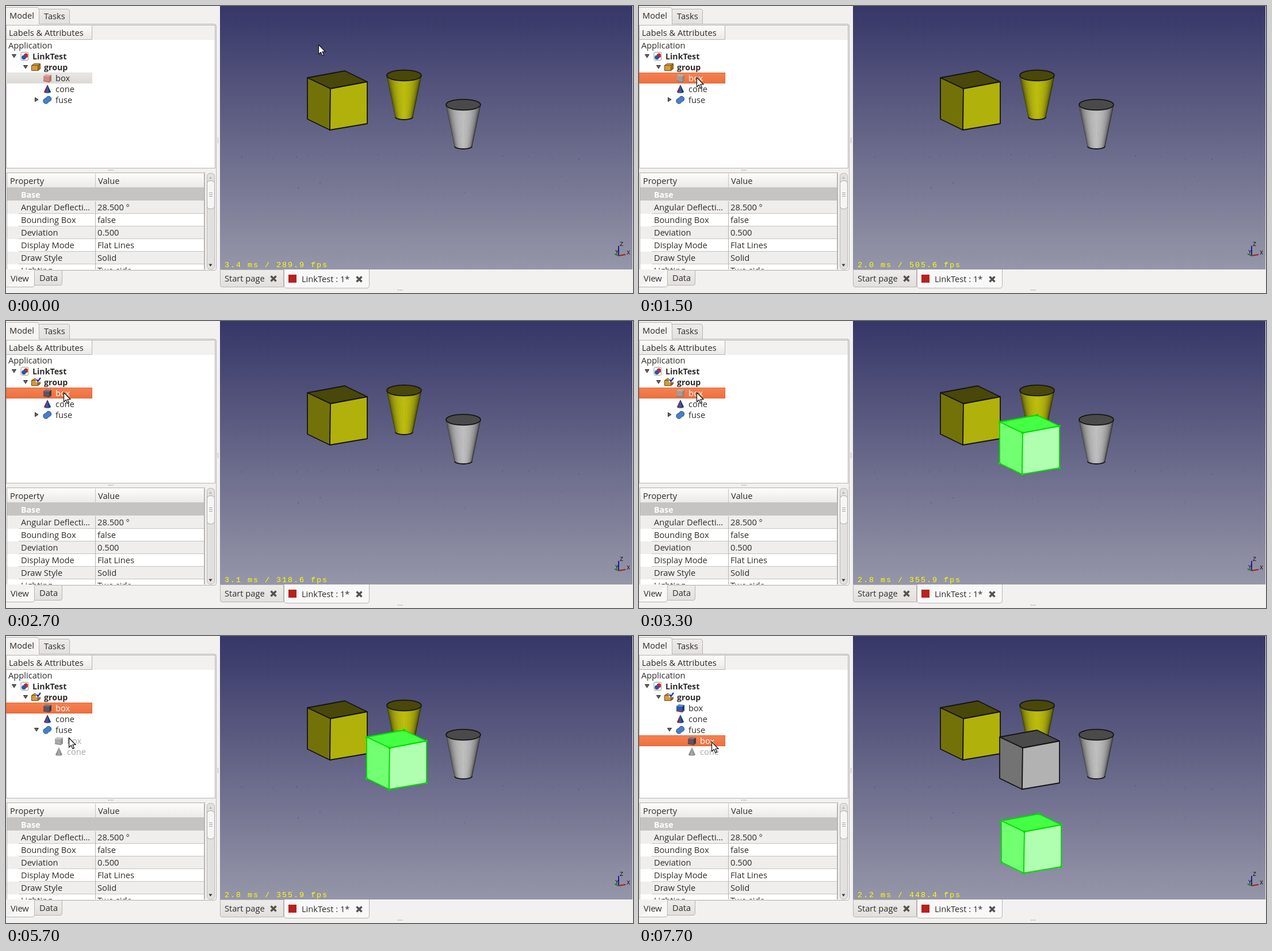
An HTML page for the animation above (8 s loop, 1090x500 px).

```html
<!DOCTYPE html>
<html lang="en">
<head>
<meta charset="utf-8">
<title>Link test</title>
<style>
  html, body { margin: 0; width: 100%; height: 100%; overflow: hidden; background: #f2f1f0; }
  svg { display: block; width: 100%; height: 100%; }
  text { font: 14.67px "Open Sans", sans-serif; fill: #2e2c2a; white-space: pre; }
  .bold { font-size: 14.2px; font-weight: 700; }
  .tree .faded { fill: #aaa8a6; }
  .tree .lit { fill: #fff; }
  .mono { font: 13.33px "Liberation Mono", monospace; letter-spacing: 2px; fill: #ff0; }
  .axis { font: 10px "Liberation Mono", monospace; fill: #111; }
  .line { fill: none; stroke: #b8b4b0; }
  .thin { fill: none; stroke: #c6c3c0; }
  .arrow { fill: #6a6865; stroke: #2e2c2a; }

  /* solids: t top, l left, r right, e edge */
  .yellow { --t: #49470a; --l: #737209; --r: #b1b10c; --e: #141414; --dot: none; }
  .gray { --t: #4a4a4a; --l: #737373; --r: #b2b2b2; --e: #141414; --dot: none; }
  .green { --t: #44ff44; --l: #72ff72; --r: #b0ffb0; --e: #00dc00; --dot: #00dc00; }

  /* tree icons: a front, b side, c top, d accent */
  .normal { --a: #2b5ca8; --b: #1c3b78; --c: #5a86c8; --d: #a3222a; }
  .pink { --a: #cd8a82; --b: #b8746d; --c: #dba79f; --d: #b9655f; }
  .ghost { --a: #aa9a90; --b: #93857d; --c: #bcaea5; --d: #8e7d75; }
  .dark { --a: #5c5560; --b: #3f3a48; --c: #80747a; --d: #6b3a3a; }
  .pale { --a: #a8a8a8; --b: #8f8f8f; --c: #c4c4c4; --d: #8c8c8c; }
</style>
</head>
<body>
<svg viewBox="0 0 1090 500" preserveAspectRatio="none">
  <defs>
    <linearGradient id="sky" x2="0" y2="1"><stop stop-color="#363668"/><stop offset="1" stop-color="#9696a9"/></linearGradient>
    <linearGradient id="head" x2="0" y2="1"><stop stop-color="#fcfcfb"/><stop offset="1" stop-color="#ebe9e7"/></linearGradient>
    <linearGradient id="tab" x2="0" y2="1"><stop stop-color="#eeecea"/><stop offset="1" stop-color="#e2e0dd"/></linearGradient>
    <linearGradient id="orange" x2="0" y2="1"><stop stop-color="#f58150"/><stop offset="1" stop-color="#ee7040"/></linearGradient>
    <linearGradient id="idle" x2="0" y2="1"><stop stop-color="#e9e7e5"/><stop offset="1" stop-color="#dcd9d6"/></linearGradient>

    <g id="cube" stroke="var(--e)" stroke-width="1.8" stroke-linejoin="round">
      <path fill="var(--t)" d="M524 125L589 113L628 132L564 144Z"/>
      <path fill="var(--l)" d="M524 125L564 144L563 216L524 197Z"/>
      <path fill="var(--r)" d="M564 144L628 132V205L563 216Z"/>
      <path fill="none" stroke="var(--dot)" stroke-width="4.5" stroke-linecap="round" d="M524 125h0M589 113h0M628 132h0M564 144h0M563 216h0M524 197h0M628 205h0"/>
    </g>

    <g id="boxIcon">
      <path fill="var(--c)" d="M1 4L5 1L15 2L11 5Z"/>
      <path fill="var(--a)" d="M1 4L11 5V14L1 12Z"/>
      <path fill="var(--b)" d="M11 5L15 2V11L11 14Z"/>
      <path fill="none" stroke="var(--d)" stroke-width="1.300" d="M1 12.500L11 14.500L15 11.500"/>
    </g>
    <g id="coneIcon">
      <path fill="var(--a)" d="M8 0L14 13Q8 17 2 13Z"/>
      <path fill="var(--d)" d="M8 0L5 14.500Q3 14 2 13Z"/>
      <path fill="var(--b)" d="M8 0L14 13L10.500 14.500Z"/>
    </g>
    <g id="fuseIcon" fill="#4680c6" stroke="#2a4f8c">
      <circle cx="10" cy="6" r="4.700"/><circle cx="5.500" cy="9.500" r="4.700"/>
      <path stroke="none" d="M5 6L10 11L13 8L8 3Z"/>
    </g>
    <path id="down" class="arrow" d="M-3.500 -2.500H3.500L0 3Z"/>
    <path id="grip" stroke="#aaa6a2" stroke-width="2" stroke-dasharray="1 1.500" d="M-4 0H5"/>
    <path id="close" fill="none" stroke="#55524e" stroke-width="3.500" d="M-4.500 -4.500L4.500 4.500M4.500 -4.500L-4.500 4.500"/>
  </defs>

  <rect width="1090" height="500" fill="#f2f1f0"/>

  <!-- property editor -->
  <rect x="1.500" y="290.500" width="344" height="169" fill="#fff" class="line"/>
  <rect x="2" y="292" width="342" height="25" fill="url(#head)"/>
  <path class="thin" d="M155.500 292V317M2 316.500H344"/>
  <text x="7" y="310">Property</text><text x="160" y="310">Value</text>
  <rect x="2" y="317" width="342" height="22" fill="#c5c4c3"/>
  <text x="26" y="334" class="bold" style="fill:#fff">Base</text>
  <g id="props"></g>
  <path class="line" d="M155.500 340V459M344.500 292V459"/>
  <rect x="349.500" y="291.500" width="13" height="167" rx="5" fill="#e3e1df" stroke="#bab6b2"/>
  <rect x="349.500" y="304.500" width="13" height="49" rx="5" fill="#f6f5f4" stroke="#a8a4a0"/>
  <path stroke="#a8a4a0" d="M353 325.500h6M353 328.500h6M353 331.500h6"/>
  <path fill="#b9b6b3" d="M353 301h5l-2.500 -4z"/>
  <path fill="#3c3b37" d="M352.500 449.500h6l-3 4.500z"/>

  <!-- left panel frame and tabs -->
  <rect y="459" width="372" height="41" fill="#f2f1f0"/>
  <path class="line" d="M57 31.500H362Q365.500 31.500 365.500 35V456Q365.500 460.500 361 460.500H49"/>
  <path fill="url(#tab)" stroke="#b8b4b0" d="M57.500 31.500V5.500H107Q110.500 5.500 110.500 9V31.500Z"/>
  <path fill="#f6f5f4" stroke="#b8b4b0" d="M0 2.500H53Q57.500 2.500 57.500 7V31.500"/>
  <text x="6" y="22">Model</text><text x="66" y="23">Tasks</text>
  <path fill="url(#tab)" stroke="#b8b4b0" d="M49.500 460.500H97.500V483Q97.500 486.500 94 486.500H49.500Z"/>
  <path fill="#f9f8f8" stroke="#b8b4b0" d="M0 489.500H45Q49.500 489.500 49.500 485V460.500"/>
  <text x="8" y="480">View</text><text x="58" y="479">Data</text>
  <use href="#grip" x="182" y="286"/>
  <use href="#grip" transform="translate(368.500 234) rotate(90)"/>
  <use href="#grip" x="685" y="495"/>

  <!-- tree -->
  <rect x=".5" y="33.500" width="363" height="249" fill="#fff" stroke="#b8b4b0"/>
  <rect x="1" y="34" width="362" height="25" fill="#f2f1f0"/>
  <rect x="1" y="34" width="149" height="24" fill="url(#head)"/>
  <path class="line" d="M1 58.500H149.500V34"/>
  <text x="5" y="52">Labels &amp; Attributes</text>
  <g class="tree">
    <rect id="row" x=".5" width="149" height="18"/>
    <text x="4" y="74">Application</text>
    <use href="#down" x="14" y="87"/>
    <rect x="26" y="80.500" width="13" height="14" rx="2" fill="#fafafa" stroke="#9a9a9a"/>
    <path fill="#c32a30" d="M31 84l4 -2l3 2v5l-4 2l-3 -2z"/>
    <circle cx="31" cy="89.500" r="3.800" fill="#29569f"/>
    <text x="46" y="93" class="bold">LinkTest</text>
    <use href="#down" x="34" y="106"/>
    <path fill="#d39a3c" stroke="#6e4813" d="M44.500 103.500L49 100.500H59.500V109.500L55 112.500H44.500Z"/>
    <path fill="#a86f20" stroke="#6e4813" d="M55.500 103.500L59.500 101V109.500L55.500 112.500Z"/>
    <path stroke="#6e4813" d="M44.500 103.500H55.500"/>
    <g id="check">
      <rect x="52" y="98" width="8.500" height="8.500" fill="#eef2ff"/>
      <path fill="none" stroke="#1733a8" stroke-width="2.200" d="M53 102l2.500 3l4.500 -6"/>
    </g>
    <text x="66" y="112" class="bold">group</text>
    <use id="boxMark" href="#boxIcon" x="64" y="118"/>
    <text id="boxLabel" x="86" y="131">box</text>
    <use href="#coneIcon" x="64" y="137" class="normal"/>
    <text x="86" y="150">cone</text>
    <use id="fold" href="#down"/>
    <use href="#fuseIcon" x="64" y="156"/>
    <text x="86" y="169">fuse</text>
    <g id="children">
      <use id="childMark" href="#boxIcon" x="84" y="175"/>
      <text id="childLabel" x="106" y="188">box</text>
      <use href="#coneIcon" x="84" y="194" class="pale"/>
      <text x="106" y="207" class="faded">cone</text>
    </g>
  </g>

  <!-- 3D view -->
  <rect x="372" width="717" height="459" fill="url(#sky)"/>
  <path stroke="#45459f" d="M409 263h2M463 266h1M504 263h2M523 261h1M549 262h1M597 261h1M646 259h2M679 260h1M722 262h1M748 171h1M862 261h2M908 262h1M949 266h1M995 267h2M1049 263h1M507 317h2M545 308h2M684 310h1M797 325h1M949 316h1M965 297h1"/>
  <use href="#cube" class="yellow"/>
  <g id="cups"></g>
  <use id="linked" href="#cube" x="103" y="51"/>
  <use id="fused" href="#cube" x="106" y="197" class="green"/>
  <g fill="none" stroke-width="2">
    <path stroke="#1c1c9c" d="M1065 435V418"/>
    <path stroke="#a41c1c" d="M1065 435L1077 433"/>
    <path stroke="#1c7c2c" d="M1065 435L1058 432"/>
  </g>
  <text class="axis" x="1067" y="418">Z</text><text class="axis" x="1079" y="433">X</text><text class="axis" x="1059" y="432">Y</text>
  <text id="fps" class="mono" x="380" y="455"></text>

  <!-- document tabs -->
  <path fill="url(#tab)" stroke="#b8b4b0" d="M372.500 459.500H482.500V489.500H376Q372.500 489.500 372.500 486Z"/>
  <path fill="#f9f8f8" stroke="#b8b4b0" d="M483.500 459V487Q483.500 491.500 488 491.500H627Q631.500 491.500 631.500 487V459"/>
  <text x="380" y="480">Start page</text><use href="#close" x="465" y="475"/>
  <rect x="491" y="468" width="14" height="14" fill="#b5221f"/>
  <text x="514" y="481">LinkTest : 1*</text><use href="#close" x="614" y="476"/>

  <path id="cursor" fill="#fff" stroke="#111" stroke-width="1.200" d="M.5 .5V17L4.300 13.500L7 19.500L9.500 18.400L7 12.500H12Z"/>
</svg>
<script>
  const LOOP = 8000, STEP = 100;
  const el = id => document.getElementById(id);
  const show = (id, on) => el(id).setAttribute('visibility', on ? 'visible' : 'hidden');
  const style = (id, name) => el(id).setAttribute('class', name);
  const valueAt = (track, t) => track.findLast(([start]) => start <= t)[1];

  const props = [
    ['Angular Deflecti…', '28.500 °'], ['Bounding Box', 'false'], ['Deviation', '0.500'],
    ['Display Mode', 'Flat Lines'], ['Draw Style', 'Solid'], ['Lighting', 'Two side']
  ];
  el('props').innerHTML = props.map(([name, value], i) => {
    const y = 340 + 22 * i;
    return `<rect x="2" y="${y}" width="342" height="22" fill="${i % 2 ? '#fff' : '#efeeed'}"/>
      <path class="thin" d="M22 ${y + 21.5}H344"/>
      <text x="26" y="${y + 16}">${name}</text><text x="159" y="${y + 16}">${value}</text>`;
  }).join('');

  // A tapered cup whose side is lit from the viewer: narrow facets darken towards the rim.
  function cup(cx, cy, kind, [r, g, b]) {
    const FACETS = 28;
    const ring = (a, rx, ry, y) => `${cx - rx * Math.cos(a)} ${cy + y + ry * Math.sin(a)}`;
    let side = '';
    for (let i = 0; i < FACETS; i++) {
      const a = Math.PI * i / FACETS, z = Math.PI * (i + 1) / FACETS;
      const light = 0.22 + 0.78 * Math.sin((a + z) / 2);
      const fill = `rgb(${[r, g, b].map(c => c * light)})`;
      side += `<path fill="${fill}" stroke="${fill}" stroke-width=".5" d="M${ring(a, 30, 9.3, 0)}L${ring(z, 30, 9.3, 0)}L${ring(z, 15, 4.5, 72.5)}L${ring(a, 15, 4.5, 72.5)}Z"/>`;
    }
    return `${side}<g class="${kind}" stroke="#141414" stroke-width="1.8">
      <path fill="none" d="M${cx - 15} ${cy + 72.5}a15 4.5 0 0 0 30 0"/>
      <ellipse cx="${cx}" cy="${cy}" rx="30" ry="9.3" fill="var(--t)"/></g>`;
  }
  el('cups').innerHTML = cup(692, 121, 'yellow', [188, 188, 13]) + cup(795, 172, 'gray', [190, 190, 190]);

  const fps = [
    [0, '3.4 ms / 289.9 fps'], [1500, '2.0 ms / 505.6 fps'], [2000, '2.3 ms / 435.2 fps'],
    [2700, '3.1 ms / 318.6 fps'], [3300, '2.8 ms / 355.9 fps'], [6200, '3.2 ms / 312.1 fps'],
    [6900, '2.2 ms / 448.4 fps']
  ];
  const linked = [[0, ''], [2000, 'green'], [2700, ''], [3300, 'green'], [6200, 'gray']];
  const boxMark = [[0, 'pink'], [1500, 'ghost'], [2200, 'dark'], [2900, 'ghost'], [3500, 'dark'], [6200, 'normal']];
  const childMark = [[0, 'pale'], [6200, 'ghost'], [7100, 'dark']];

  // start, number of steps, end x, end y
  const moves = [
    [300, 8, 97, 132], [1100, 1, 98, 127], [1200, 1, 100, 124], [4000, 4, 87, 164],
    [4600, 5, 52, 164], [5600, 4, 128, 181], [7600, 2, 126, 184]
  ];

  function cursorAt(t) {
    let x = 543, y = 67;
    for (const [start, steps, endX, endY] of moves) {
      if (t < start) break;
      const p = Math.min(1, (Math.floor((t - start) / STEP) + 1) / steps);
      const ease = 1 - (1 - p) ** 2;
      x += (endX - x) * ease;
      y += (endY - y) * ease;
    }
    return [Math.round(x), Math.round(y)];
  }

  function draw(t) {
    const active = t >= 1500, open = t >= 5200, onChild = t >= 6200;
    const row = el('row');
    row.setAttribute('y', onChild ? 173.5 : 116.5);
    row.setAttribute('fill', active ? 'url(#orange)' : 'url(#idle)');
    row.setAttribute('stroke', active ? '#d9683a' : '#dfdcda');
    style('boxMark', valueAt(boxMark, t));
    style('boxLabel', active && !onChild ? 'lit' : '');
    style('childMark', valueAt(childMark, t));
    style('childLabel', onChild ? 'lit' : 'faded');
    show('check', t >= 2200);
    show('children', open);
    el('fold').setAttribute('transform', `translate(53 163) rotate(${open ? 0 : -90})`);

    const solid = valueAt(linked, t);
    style('linked', solid);
    show('linked', solid);
    show('fused', t >= 6900);
    el('fps').textContent = valueAt(fps, t);
    el('cursor').setAttribute('transform', `translate(${cursorAt(t)})`);
  }

  const begin = performance.now();
  function tick() {
    draw((performance.now() - begin) % LOOP);
    requestAnimationFrame(tick);
  }
  tick();
</script>
</body>
</html>
```
